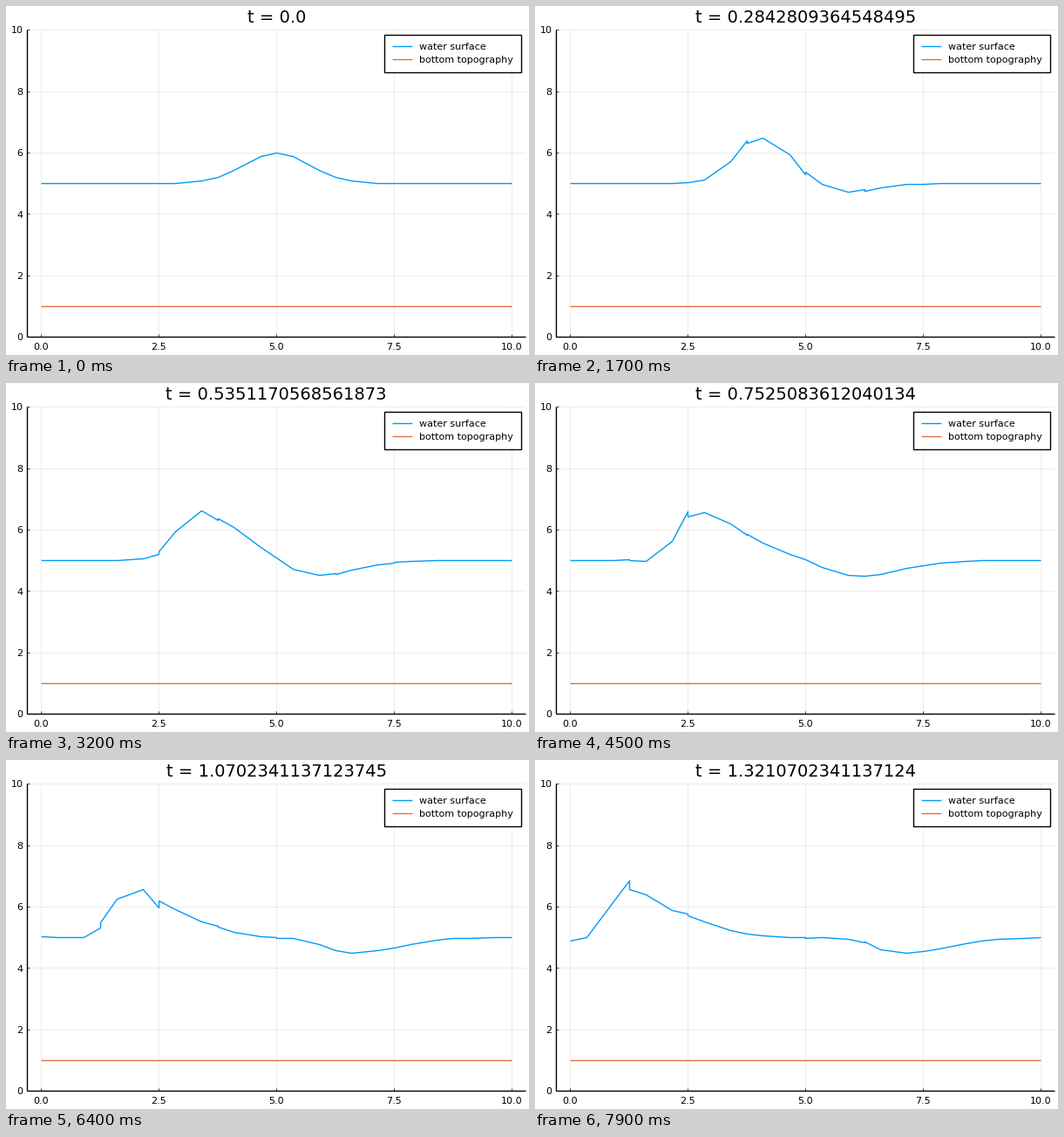
Write a matplotlib script that moves like this. It is 600 by 400 pixels and loops after 8000 ms.

```python
import numpy as np
import matplotlib.pyplot as plt
from matplotlib.animation import FuncAnimation
from matplotlib.patches import Rectangle

plt.rcParams["font.family"] = "DejaVu Sans"

FRAMES, STEP = 80, 5 / 299
CELLS, WIDTH = 8, 1.25
DEPTH, FLOOR = 4, 1
BLUE, ORANGE = "#009af9", "#e26f46"

# Shallow water (g = 1) by a discontinuous Galerkin scheme on Lobatto nodes
NODES = np.array([-1, -np.sqrt(0.2), np.sqrt(0.2), 1])
END_WEIGHT = 1 / 6
X = WIDTH * (np.arange(CELLS)[:, None] + (NODES + 1) / 2)


def derivative_matrix(nodes):
    gap = nodes[:, None] - nodes + np.eye(len(nodes))
    bary = 1 / gap.prod(axis=1)
    d = bary / bary[:, None] / gap
    np.fill_diagonal(d, 0)
    return d - np.diag(d.sum(axis=1))


D = derivative_matrix(NODES)


def flux(q):
    h, m = q
    return np.array([m, m * m / h + h * h / 2])


def rhs(q):
    h, m = q
    pair = lambda a: (a[:, :, None] + a[:, None, :]) / 2
    mass = pair(m)
    volume = np.array([mass, mass * pair(m / h) + h[:, :, None] * h[:, None, :] / 2])
    dq = 2 * np.einsum("ij,ceij->cei", D, volume)

    # Lax-Friedrichs flux between cells, still water beyond both ends
    first, last = q[:, :, 0], q[:, :, -1]
    still = np.array([[DEPTH], [0]])
    left, right = np.hstack([still, last]), np.hstack([first, still])
    speed = (np.maximum(abs(left[1] / left[0]), abs(right[1] / right[0]))
             + np.sqrt(np.maximum(left[0], right[0])))
    face = (flux(left) + flux(right) - speed * (right - left)) / 2
    dq[:, :, -1] += (face[:, 1:] - flux(last)) / END_WEIGHT
    dq[:, :, 0] -= (face[:, :-1] - flux(first)) / END_WEIGHT
    return -2 / WIDTH * dq


def rk4(q, dt):
    a = rhs(q)
    b = rhs(q + dt / 2 * a)
    c = rhs(q + dt / 2 * b)
    d = rhs(q + dt * c)
    return q + dt / 6 * (a + 2 * b + 2 * c + d)


def simulate(substeps=4):
    """Surface height per frame; the bump starts out moving left."""
    bump = np.exp(-(X - 5) ** 2)
    h = DEPTH + bump
    q = np.array([h, -bump * h])
    rows = []
    for _ in range(FRAMES):
        rows.append(q[0].ravel() + FLOOR)
        for _ in range(substeps):
            q = rk4(q, STEP / substeps)
    return np.array(rows)


SURFACE = simulate()

# Stage in pixels, y downwards
LEFT, RIGHT, TOP, BOTTOM = 24.3, 596.1, 27.2, 379.25
TICK = 3
px = lambda x: LEFT + (np.asarray(x) + 0.3) * (RIGHT - LEFT) / 10.6
py = lambda y: BOTTOM - np.asarray(y) * (BOTTOM - TOP) / 10

fig = plt.figure(figsize=(6, 4), dpi=100, facecolor="white")
ax = fig.add_axes([0, 0, 1, 1])
ax.set(xlim=(0, 600), ylim=(400, 0))
ax.axis("off")


def line(xs, ys, color="black", lw=1.0, z=2, **kw):
    return ax.plot(xs, ys, color=color, lw=lw, zorder=z, snap=True,
                   solid_capstyle="butt", **kw)[0]


def label(x, y, text, ha="center", size=8):
    return ax.text(x, y, text, ha=ha, va="baseline", fontsize=size, zorder=6)


for value in np.arange(0, 10.1, 2.5):
    x = px(value)
    line([x, x], [TOP, BOTTOM], lw=0.5, z=1, alpha=0.1)
    line([x, x], [BOTTOM, BOTTOM - TICK], lw=0.5)
    label(x, 394, f"{value:.1f}")
for value in range(0, 11, 2):
    y = py(value)
    line([LEFT, RIGHT], [y, y], lw=0.5, z=1, alpha=0.1)
    line([LEFT, LEFT + TICK], [y, y], lw=0.5)
    label(19.5, y + 4.15, str(value), ha="right")
line([LEFT, LEFT], [TOP, BOTTOM])
line([LEFT, RIGHT], [BOTTOM, BOTTOM])

water = line(px(X.ravel()), py(SURFACE[0]), BLUE, z=3)
line(px([0, 10]), py([FLOOR, FLOOR]), ORANGE, z=3)

ax.add_patch(Rectangle((434.4, 33.4), 157, 43, fc="white", ec="black", lw=1, zorder=4))
for y, color, text in [(46, BLUE, "water surface"),
                       (61, ORANGE, "bottom topography")]:
    line([443, 466], [y, y], color, z=5)
    label(474, y + 4, text, ha="left")

title = label((LEFT + RIGHT) / 2, 19, "", size=14)


def draw(k):
    water.set_ydata(py(SURFACE[k]))
    title.set_text(f"t = {5 * k / 299!r}")
    return water, title


anim = FuncAnimation(fig, draw, frames=FRAMES, interval=100, repeat=True,
                     repeat_delay=0, blit=False)
plt.show()
```
